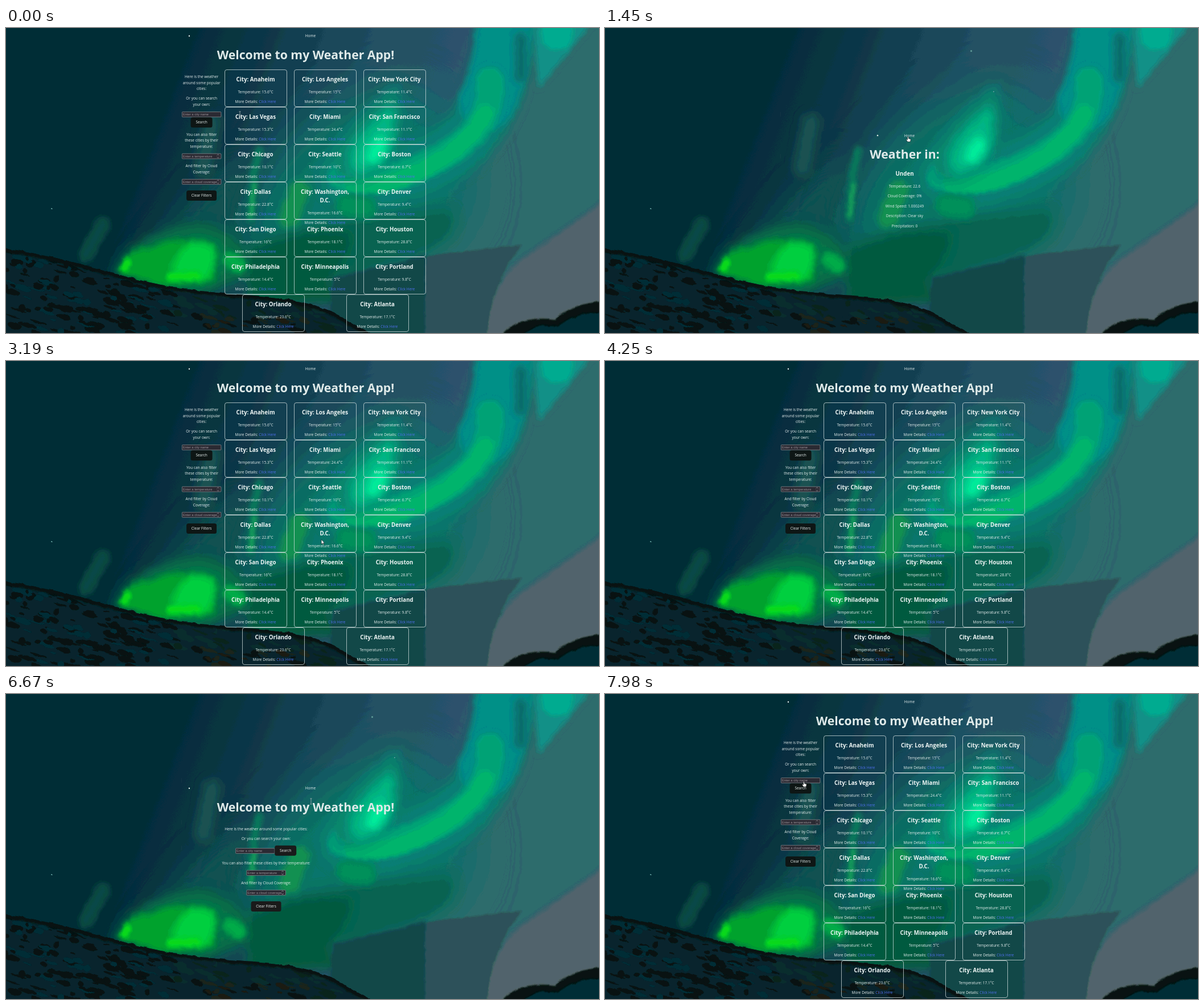
An HTML page with a canvas for the animation above (8 s loop, 1042 by 537 pixels).

```html
<!DOCTYPE html>
<html lang="en">
<head>
<meta charset="utf-8">
<title>Weather App</title>
<style>
  html, body { margin: 0; width: 100%; height: 100%; overflow: hidden; background: #01282f; }
  main { position: absolute; inset: 0; overflow: hidden; contain: strict; }
  canvas { position: absolute; left: -8px; top: -8px; filter: url(#rough); }
  svg { position: absolute; left: 0; top: 0; }
  text { font: 6.5px "Open Sans", "Noto Sans", sans-serif; fill: #e6efee; text-anchor: middle; }
  .h1 { font-size: 21.2px; font-weight: 700; fill: #dfeae9; }
  .h2 { font-size: 9.75px; font-weight: 700; fill: #eef5f4; }
  .hint { font: 5.8px "Liberation Sans", Arial, sans-serif; fill: #989096; text-anchor: start; }
  .link { fill: #4f6fee; }
  .card { fill: none; stroke: #d8e4e3; stroke-opacity: .72; }
  .btn { fill: #0e1615; }
  #home .btn { fill: #1a1a1a; }
  .hover .btn { stroke: #3d4244; }
  .input { fill: #2b2a33; stroke: #85858a; stroke-width: .8; }
  .spin { fill: none; stroke: #a5a3a8; stroke-width: .7; }
  .page, .cur { display: none; }
  .on { display: inline; }
  #arrow, #hand { fill: #fff; stroke: #111; stroke-width: .6; }
  #beam { fill: none; stroke: #a9b6b6; stroke-width: .8; }
</style>
</head>
<body>
<main>
<canvas id="sky" width="1058" height="553"></canvas>
<svg width="1042" height="537" viewBox="0 0 1042 537">
  <filter id="rough" x="0" y="0" width="100%" height="100%" color-interpolation-filters="sRGB">
    <feTurbulence type="fractalNoise" baseFrequency=".07" numOctaves="2" seed="4"/>
    <feDisplacementMap in="SourceGraphic" scale="6" xChannelSelector="R" yChannelSelector="G"/>
  </filter>
  <g id="list" class="page"></g>
  <g id="city" class="page"></g>
  <g id="home" class="page"></g>
  <g id="cursor">
    <path id="arrow" class="cur" d="M0 0V8L1.9 6.3 3.1 9 4.3 8.5 3.2 5.9H5.6Z"/>
    <path id="hand" class="cur" d="M-.9.7Q0-.5.8.7V3.6L4 4.4Q4.8 4.7 4.7 5.6L4 9.3H-.8L-3 6Q-3.2 4.7-2 5L-.9 6Z"/>
    <path id="beam" class="cur" d="M-1.6-5H1.6M0-5V5M-1.6 5H1.6"/>
  </g>
</svg>
</main>
<script>
const $ = id => document.getElementById(id);

/* Backdrop: soft lights, then reduced to flat colour bands */
const sky = $('sky'), g = sky.getContext('2d', { willReadFrequently: true });
g.translate(8, 8);
g.lineCap = 'round';

// Blurred shape: a stroke of the given width, or a fill when width is 0
function glow(color, blur, width, d) {
  g.filter = blur ? `blur(${blur}px)` : 'none';
  g.fillStyle = g.strokeStyle = color;
  g.lineWidth = width;
  g[width ? 'stroke' : 'fill'](new Path2D(d));
}

function night() {
  const grad = g.createLinearGradient(260, 100, 818, 317);
  ['#012d36', '#0a3444', '#164355', '#245164', '#2a556a', '#2f6869']
    .forEach((c, i) => grad.addColorStop(i / 5, c));
  glow(grad, 0, 0, 'M-8-8H1050V545H-8Z');
  glow('#546569', 3, 0, 'M1060 300L925 395Q845 440 842 560H1060Z');
}

function aurora() {
  glow('#0f5050', 22, 0, 'M230 420Q330 270 420 220L430 460H220Z');
  glow('#0a7468', 36, 0, 'M420 350Q470 150 690 100Q800 130 820 250T700 420H440Z');
  glow('#05644f', 10, 0, 'M425 380Q500 345 780 320Q810 370 700 405T430 500Z');
  glow('#045940', 8, 0, 'M420 400Q520 350 605 362Q600 410 565 440L590 485H430Z');
  glow('#14484c', 2, 0, 'M575 440L738 400V560H560Z');
  glow('#2d5256', 1, 0, 'M738 402L905 382Q850 450 842 560H738Z');

  // Great arc and its source
  glow('#087f72', 8, 100, 'M880-60C885 90 840 200 740 240S620 265 600 260');
  glow('#038c86', 5, 100, 'M875-60Q880 60 845 130');
  glow('#128f86', 4, 0, 'M925-20H1040L935 108Z');
  glow('#00ab8e', 4, 56, 'M968-8V12');
  glow('#0a706f', 4, 22, 'M905 18V85');
  glow('#00a478', 4, 48, 'M850 92C858 165 805 210 740 240S640 270 590 262');
  glow('#00b26e', 3, 32, 'M842 150Q815 205 740 245T610 272');

  // Central flame
  glow('#07866f', 10, 0, 'M688 95Q710 230 640 262T575 225Q590 180 688 95Z');
  glow('#00b884', 9, 0, 'M680 135Q692 220 645 248T605 220Q620 180 680 135Z');
  glow('#00ee9b', 8, 26, 'M658 205L645 226');

  // Small flares
  glow('#008c59', 4, 42, 'M600 312L630 316');
  glow('#12914f', 6, 36, 'M516 285L497 335');
  glow('#0c7d5a', 4, 13, 'M445 215Q432 260 430 335');
  glow('#12a65c', 3, 6, 'M437 275L430 330');
  glow('#0b4c44', 4, 26, 'M170 345L140 400');
  glow('#18504f', 7, 34, 'M362 165L346 245');

  // Glow over the left ridge
  glow('#057246', 10, 0, 'M188 430Q220 360 340 345Q420 360 430 430L330 475Z');
  glow('#00a030', 5, 0, 'M198 430Q210 385 250 388Q340 340 368 445L270 455Z');
  glow('#00cc3c', 6, 0, 'M285 445Q300 370 345 375T355 445Z');
  glow('#06dc1c', 3, 14, 'M213 412L208 424M290 438L335 436');
  glow('#00a84a', 4, 28, 'M395 408L408 418');
  glow('#5d9a9a', 0, 2, 'M81 318h1M643 41h1M681 113h1');
}

let seed = 11;
const rnd = () => (seed = seed * 16807 % 2147483647) / 2147483647;
const pick = list => list[rnd() * list.length | 0];

function ground() {
  const rim = 'M-10 386Q90 402 190 432T420 470T600 515L680 560';
  g.save();
  glow('#05232a', 0, 0, rim + 'H-10Z');
  g.clip(new Path2D(rim + 'H-10Z'));
  for (let i = 0; i < 420; i++) {
    const x = rnd() * 640, y = 390 + rnd() * 150, rock = x > 320 && x < 540 && y > 508;
    g.fillStyle = rock ? pick(['#1b2019', '#171a14', '#0b1512'])
      : x > 300 ? pick(['#07262a', '#0a3031', '#08201f'])
      : pick(['#05130f', '#06110f', '#032d37']);
    g.beginPath();
    g.ellipse(x, y, 3 + rnd() * 15, 1 + rnd() * 5, .3, 0, 7);
    g.fill();
  }
  glow('#06130f', 1, 12, rim);
  g.restore();
  glow('#05130f', 1, 0, 'M860 560Q880 505 965 514Q990 485 1060 480V560Z');
  glow('#02303a', 1, 0, 'M895 560Q920 515 970 526Q1000 500 1060 500V560Z');
}

function posterize(step) {
  const img = g.getImageData(0, 0, sky.width, sky.height);
  img.data.forEach((v, i) => { if (i % 4 < 3) img.data[i] = Math.round(v / step) * step; });
  g.putImageData(img, 0, 0);
}

night();
aurora();
ground();
posterize(9);

/* Pages */
const PITCH = 10.3, BLOCK = 17.4;

const text = (x, y, s, cls = '') => {
  const size = { h1: 21.2, h2: 9.75, hint: 5.8 }[cls] || 6.5;
  return `<text class="${cls}" x="${x}" y="${y + size * .35}">${s}</text>`;
};
const box = (x, y, w, h, r, cls) =>
  `<rect class="${cls}" x="${x}" y="${y}" width="${w}" height="${h}" rx="${r}"/>`;
const header = (bullet, y, title) =>
  `<circle cx="${bullet}" cy="${y}" r="1.2" fill="#e6efee"/>` +
  text(535, y, 'Home') + text(526.5, y + 33.5, title, 'h1');

// Every part is centred on x, y
const para = s => (x, y) => s.split('|').map((row, i) => text(x, y + i * PITCH, row)).join('');
const button = (s, w) => (x, y) => box(x - w / 2, y - 9, w, 18, 3.5, 'btn') + text(x, y, s);
const input = (s, spin) => (x, y) =>
  box(x - 34.2, y - 4.5, 68.5, 9, .8, 'input') + text(x - 32.7, y, s, 'hint') +
  (spin ? `<path class="spin" d="M${x + 27} ${y - 1.3}l2-1.9 2 1.9m-4 2.6l2 1.9 2-1.9"/>` : '');

// Stacks [part, distance to the next part]
const stack = (x, y, parts) => parts.map(([part, gap = BLOCK]) => {
  const out = part(x, y);
  y += gap;
  return out;
}).join('');

const find = input('Enter a city name'), search = button('Search', 38), clear = button('Clear Filters', 53);
const byTemp = input('Enter a temperature', true), byCloud = input('Enter a cloud coverage', true);
const searchRow = (x, y) => find(x - 19.2, y) + search(x + 34.2, y - .5);

function card(x, y, name, temp) {
  const rows = name.split('|'), cx = x + 54.5, low = y + 39.4 + (rows.length - 1) * 15.3;
  return box(x + .5, y + .5, 109, 65, 3.5, 'card') +
    rows.map((s, i) => text(cx, y + 17.7 + i * 15.3, (i ? '' : 'City: ') + s, 'h2')).join('') +
    text(cx, low, `Temperature: ${temp}°C`) +
    text(cx, low + BLOCK, 'More Details: <tspan class="link">Click Here</tspan>');
}

const cities = `Anaheim 15.6; Los Angeles 15; New York City 11.4; Las Vegas 15.3; Miami 24.4;
  San Francisco 11.1; Chicago 10.1; Seattle 10; Boston 6.7; Dallas 22.8; Washington,|D.C. 16.6;
  Denver 9.4; San Diego 16; Phoenix 18.1; Houston 28.8; Philadelphia 14.4; Minneapolis 5;
  Portland 9.8; Orlando 23.6; Atlanta 17.1`.split(';').map(s => s.trim().match(/(.+) (\S+)/).slice(1));

const welcome = 'Welcome to my Weather App!';

$('list').innerHTML = header(322, 14, welcome) +
  stack(343.6, 86, [
    [para('Here is the weather|around some popular|cities:'), 2 * PITCH + BLOCK],
    [para('Or you can search|your own:'), PITCH + BLOCK + .5],
    [find, 14], [search, 21.5],
    [para('You can also filter|these cities by their|temperature:'), 2 * PITCH + BLOCK],
    [byTemp], [para('And filter by Cloud|Coverage:'), PITCH + BLOCK],
    [byCloud, 24.3], [clear]
  ]) +
  cities.map((city, i) => {
    const row = i / 3 | 0, x = row < 6 ? 384 + i % 3 * 122 : 415 + i % 3 * 183;
    return card(x, 73 + row * 66, ...city);
  }).join('');

$('city').innerHTML = header(479, 189.3, 'Weather in:') + text(526.5, 257, 'Unden', 'h2') +
  stack(526.5, 278.7, ['Temperature: 22.6', 'Cloud Coverage: 0%', 'Wind Speed: 1.000249',
    'Description: Clear sky', 'Precipitation: 0'].map(s => [para(s)]));

$('home').innerHTML = header(322, 166, welcome) +
  stack(457, 237.5, [
    [para('Here is the weather around some popular cities:')],
    [para('Or you can search your own:'), 21.3],
    [searchRow, 21.3],
    [para('You can also filter these cities by their temperature:')],
    [byTemp], [para('And filter by Cloud Coverage:')],
    [byCloud, 24.3], [clear]
  ]);

/* Timeline */
const LOOP = 8000, STEP = 145;
const scenes = [[0, 'list'], [450, 'city'], [1700, 'home'], [1970, 'list'],
  [5390, 'city'], [6520, 'home'], [6820, 'list']];
const moves = [
  [0, 411, 152, 'beam'], [300, 460, 134, 'hand'], [880, 460, 134, 'arrow'],
  [1310, 532.5, 191, 'hand'], [1970, 532.5, 191, 'arrow'], [2090, 500, 231, 'arrow'],
  [2920, 550, 310, 'arrow'], [4090, 583, 345, ''], [4400, 560, 350, 'arrow'],
  [5120, 583.5, 394.5, 'arrow'], [5550, 583.5, 394.5, 'arrow'], [6250, 536, 189, 'hand'],
  [6520, 536, 189, 'beam'], [6820, 536, 189, 'arrow'], [7570, 360, 166, 'hand'],
  [7980, 349.5, 154, 'hand'], [LOOP, 349.5, 154, 'hand']
];
const last = (keys, t) => keys.reduce((n, k, i) => k[0] <= t ? i : n, 0);
const show = (ids, on) => ids.forEach(id => $(id).classList.toggle('on', id === on));

function draw() {
  const t = performance.now() % LOOP;
  show(['list', 'city', 'home'], scenes[last(scenes, t)][1]);

  const i = last(moves, t), [t0, x0, y0, kind] = moves[i], [t1, x1, y1] = moves[i + 1];
  const n = Math.max(1, Math.round((t1 - t0) / STEP));
  const p = Math.floor((t - t0) / (t1 - t0) * n) / n;
  const x = x0 + (x1 - x0) * p, y = y0 + (y1 - y0) * p;
  $('cursor').setAttribute('transform', `translate(${x} ${y})`);
  show(['arrow', 'hand', 'beam'], kind);
  requestAnimationFrame(draw);
}
draw();
</script>
</body>
</html>
```
